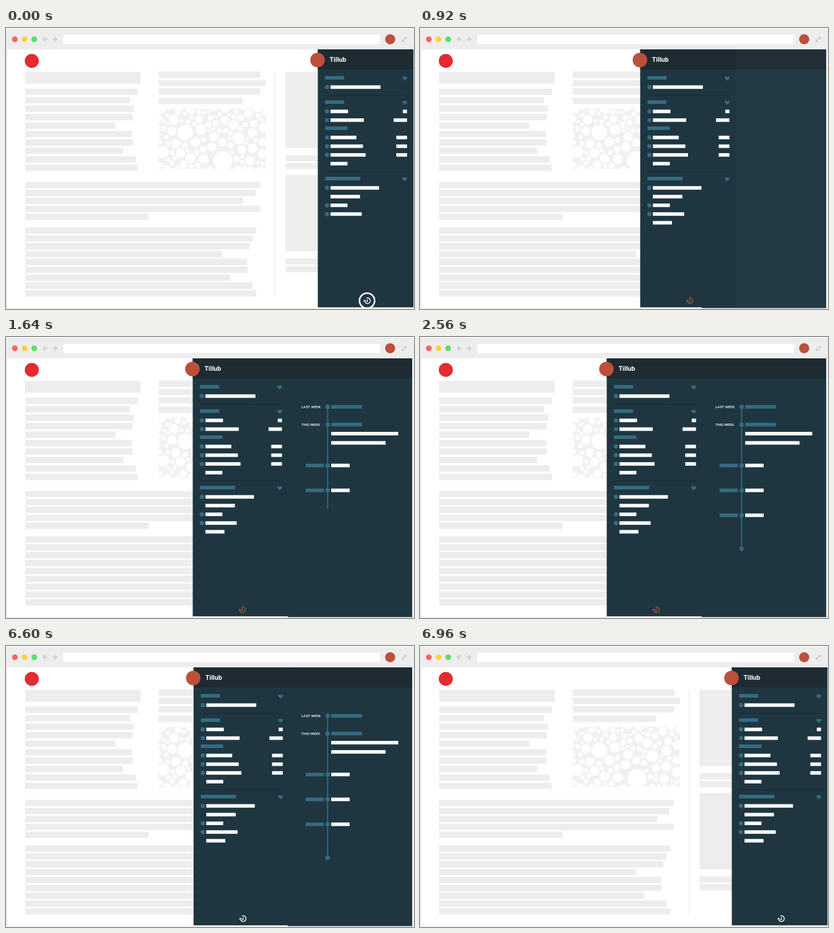
Animation, 685 px wide and 474 px high, one loop 9.96 s. Source, as an HTML page:

```html
<!DOCTYPE html>
<html lang="en">
<head>
<meta charset="utf-8">
<title>Browser sidebar</title>
<style>
  html, body { margin: 0; width: 100%; height: 100%; overflow: hidden; background: #fff; }
  svg { display: block; width: 685px; height: 474px; }
  text { font-family: Roboto, "Liberation Sans", sans-serif; fill: #fff; }
  .brand { font-size: 11px; font-weight: 700; }
  .label { font-size: 6.1px; font-weight: 500; }
</style>
</head>
<body>
<svg id="stage" viewBox="0 0 685 474" xmlns="http://www.w3.org/2000/svg"></svg>
<script>
const LOOP = 9960, STEP = 40, SHIFT = 210;
const GREY = '#ededed', PANEL = '#1f3641', HEADER = '#1e2b32', TEAL = '#346c82',
      WHITE = '#f8fafb', RUST = '#bd503b';

const stage = document.getElementById('stage');

function add(parent, tag, attrs, text) {
  const node = document.createElementNS(stage.namespaceURI, tag);
  for (const key in attrs) node.setAttribute(key, attrs[key]);
  if (text) node.textContent = text;
  parent.append(node);
  return node;
}
const group = (parent, attrs) => add(parent, 'g', attrs);
const rect = (parent, x, y, width, height, fill, rx = 0) =>
  add(parent, 'rect', { x, y, width, height, fill, rx });
const bar = (parent, x, middle, width, fill) => rect(parent, x, middle - 3, width, 6, fill);
const dot = (parent, cx, cy, r, fill) => add(parent, 'circle', { cx, cy, r, fill });
const stroke = (parent, d, color, width) =>
  add(parent, 'path', { d, fill: 'none', stroke: color, 'stroke-width': width });

function drawBrowser() {
  rect(stage, 0, 1, 685, 472.5, GREY, 4);
  rect(stage, 2.5, 36, 680.5, 436, '#fff');
  ['#ff6260', '#ffd33a', '#54e26a'].forEach((color, i) => dot(stage, 14.8 + 16.3 * i, 19, 4.8, color));
  stroke(stage, 'M70 19H63m3.5 -3.7l-3.7 3.7l3.7 3.7M78 19h7m-3.5 -3.7l3.7 3.7l-3.7 3.7', '#c9c9c9', 1.7);
  rect(stage, 96, 11.5, 532, 15.5, '#fff', 2);
  dot(stage, 645, 19, 8.5, RUST);
  stroke(stage, 'M666 22l5.5 -5.5m-2.7 -.7h3.4v3.4m-6.9 0v3.4h3.4', '#c9c9c9', 1.3);
}

// Text lines whose right edge swings back every third line, most in the middle
function paragraph(x, top, pitch, count, end, rag, phase) {
  for (let i = 0; i < count; i++) {
    const swing = Math.cos(Math.PI * (i - phase) / 3) ** 2 * Math.sin(Math.PI * i / (count - 1));
    rect(stage, x, top + pitch * i, end - x - rag * swing, 10.8, GREY);
  }
}

function drawPage() {
  dot(stage, 43.3, 55.5, 11.8, '#e32b30');
  rect(stage, 32, 74, 194, 20, GREY);
  paragraph(32, 102.2, 14.27, 10, 221, 38, 1);
  paragraph(256.5, 73.2, 14.1, 3, 427, -9, 1);
  rect(stage, 256.5, 117.5, 140, 10.8, GREY);
  paragraph(32, 259.5, 13.4, 4, 426, 32, 2);
  rect(stage, 32, 313, 207.5, 10.8, GREY);
  paragraph(32, 336.2, 13.27, 9, 420, 62, 0);
  rect(stage, 451, 74, 1.3, 379, GREY);
  for (const y of [74, 248]) {
    rect(stage, 469.5, y, 180, 128.5, GREY);
    for (const below of [140.4, 153.8]) rect(stage, 469.5, y + below, 180, 10.5, GREY);
  }
}

function drawBubbles() {
  const clip = add(add(stage, 'defs'), 'clipPath', { id: 'picture' });
  rect(clip, 256.5, 136, 179.5, 101.5);
  const art = group(stage, { 'clip-path': 'url(#picture)' });
  rect(art, 256, 136, 180, 102, '#f1f1f1');
  const placed = [[301, 176, 13], [364, 224, 16], [264, 209, 10], [390, 186, 10], [327, 171, 9]];
  let seed = 11;
  const random = () => (seed = seed * 16807 % 2147483647) / 2147483647;
  for (let i = 0; i < 3000; i++) {
    const x = 252 + random() * 188, y = 132 + random() * 110;
    const room = Math.min(...placed.map(([cx, cy, r]) => Math.hypot(x - cx, y - cy) - r)) - 1.9;
    if (room > 2.5) placed.push([x, y, Math.min(room, 8)]);
  }
  placed.forEach(([x, y, r]) => dot(art, x, y, r, '#fff'));
}

function drawPane(x, width, height) {
  const pane = group(stage);
  rect(pane, x, 36, width, height, PANEL);
  rect(pane, x, 36, width, 34, HEADER);
  return pane;
}

function drawTimeline() {
  const pane = drawPane(473, 209, 436.5);
  const line = rect(pane, 539.1, 118, 1.8, 0, TEAL);
  const entries = [];
  const entry = y => {
    const item = group(pane);
    dot(item, 540, y, 3.7, TEAL);
    entries.push({ y, item });
    return item;
  };
  const week = (y, label) => {
    const item = entry(y);
    add(item, 'text', { x: 496, y: y + 2.3, class: 'label' }, label);
    bar(item, 546, y, 51.7, TEAL);
    return item;
  };
  week(117.8, 'LAST WEEK');
  const current = week(147.7, 'THIS WEEK');
  bar(current, 546, 163, 112.5, WHITE);
  bar(current, 546, 178.6, 91.3, WHITE);
  for (let i = 0; i < 3; i++) {
    const y = 216.7 + 42 * i, item = entry(y);
    bar(item, 503, y, 30.7, TEAL);
    bar(item, 546, y, 31, WHITE);
  }
  entry(357.2);
  return { pane, line, entries };
}

// Marks: o is a dot, s a square, - an indented row without either
const SECTIONS = [
  { y: 84, title: 32, marks: 'o', rows: [84], heart: true },
  { y: 125, title: 32, marks: 'os', rows: [29.5, 56], values: [7, 22.5], heart: true },
  { y: 169, title: 37.5, marks: 'ooo-', rows: [43.5, 54.5, 59, 28.5], values: [18, 18, 18] },
  { y: 254, title: 59, marks: 'o-oo-', rows: [81.5, 49.5, 28.5, 52.5, 32], heart: true },
];

function drawSection(parent, { y, title, marks, rows, values = [], heart }) {
  bar(parent, 535.7, y, title, TEAL);
  if (heart) {
    add(parent, 'path', { fill: TEAL, transform: `translate(669.5 ${y + .7})`,
      d: 'M0 4L-3.7 .3Q-4.9 -2.8 -2.1 -3Q-.7 -3 0 -1.6Q.7 -3 2.1 -3Q4.9 -2.8 3.7 .3Z' });
  }
  return rows.map((width, i) => {
    const middle = y + 15.7 + 14.7 * i;
    if (marks[i] === 'o') dot(parent, 539, middle, 3.6, TEAL);
    if (marks[i] === 's') bar(parent, 536, middle, 6, TEAL);
    if (values[i]) bar(parent, 673.3 - values[i], middle, values[i], WHITE);
    return bar(parent, 544.8, middle, width, WHITE);
  }).pop();
}

function drawSidebar() {
  const panel = drawPane(523.5, 160.5, 435.2);
  dot(panel, 523, 54, 12.2, RUST);
  add(panel, 'text', { x: 543.3, y: 57, class: 'brand' }, 'Tillub');
  for (const y of [113, 242]) rect(panel, 536, y, 137.5, 1.2, '#1a2b33');
  const lastRow = SECTIONS.map(section => drawSection(panel, section)).pop();
  const ring = add(panel, 'circle', { cx: 606.2, cy: 460, fill: 'none', stroke: '#fff', 'stroke-width': 2.6 });
  const icon = stroke(panel,
    'M605 455.5A4.8 4.8 0 1 1 602.3 461.5M600.4 461.3l1.8 -2.2l2.2 1.6M607.1 457.6l-.7 4h-1.6', '#fff', 1.4);
  return { panel, lastRow, ring, icon };
}

drawBrowser();
drawPage();
drawBubbles();
const timeline = drawTimeline();
const sidebar = drawSidebar();

const progress = (t, start, length) => Math.min(1, Math.max(0, (t - start) / length));
const easeInOut = u => u < .5 ? 4 * u ** 3 : 1 - 4 * (1 - u) ** 3;
const mix = (a, b, u) => Math.round(a + (b - a) * u);

const OPEN = 680, CLOSE = 6552, SLIDE = 404, FADE_POWER = 4.3;
const PRESS = 6000, RELEASE = 480;
const DRAW = 1080, DRAW_TIME = 1480, DRAW_POWER = 2.65, LINE_TOP = 118, LINE_LENGTH = 239.2;
// Moment at which the growing line reaches a given height
const reachTime = y => DRAW + DRAW_TIME * (1 - Math.max(0, 1 - (y - LINE_TOP) / LINE_LENGTH) ** (1 / DRAW_POWER));

function render(t) {
  const opening = progress(t, OPEN, SLIDE), closing = progress(t, CLOSE, SLIDE);
  const open = easeInOut(opening) - easeInOut(closing);
  sidebar.panel.setAttribute('transform', `translate(${-SHIFT * open})`);
  timeline.pane.setAttribute('opacity', 1 - (1 - opening) ** FADE_POWER - closing ** FADE_POWER);

  const drawn = 1 - (1 - progress(t, DRAW, DRAW_TIME)) ** DRAW_POWER;
  timeline.line.setAttribute('height', LINE_LENGTH * drawn);
  for (const { y, item } of timeline.entries)
    item.setAttribute('opacity', progress(t, Math.min(reachTime(y), 2440), 120));

  // The button is pressed at the start and again before closing
  const first = progress(t, 0, RELEASE), second = progress(t, PRESS, RELEASE);
  const released = t < 5840 ? first : second, rust = first - second;
  sidebar.ring.setAttribute('r', 12.7 + 2.5 * released);
  sidebar.ring.setAttribute('opacity', 1 - released);
  sidebar.icon.setAttribute('stroke', `rgb(${mix(255, 200, rust)},${mix(255, 86, rust)},${mix(255, 58, rust)})`);
  sidebar.icon.setAttribute('stroke-width', 1.4 - .2 * rust);
  sidebar.lastRow.setAttribute('opacity', t < STEP ? 0 : 1);
}

const start = performance.now();
function tick() {
  const t = (performance.now() - start) % LOOP;
  render(Math.floor(t / STEP) * STEP);
  requestAnimationFrame(tick);
}
tick();
</script>
</body>
</html>
```
